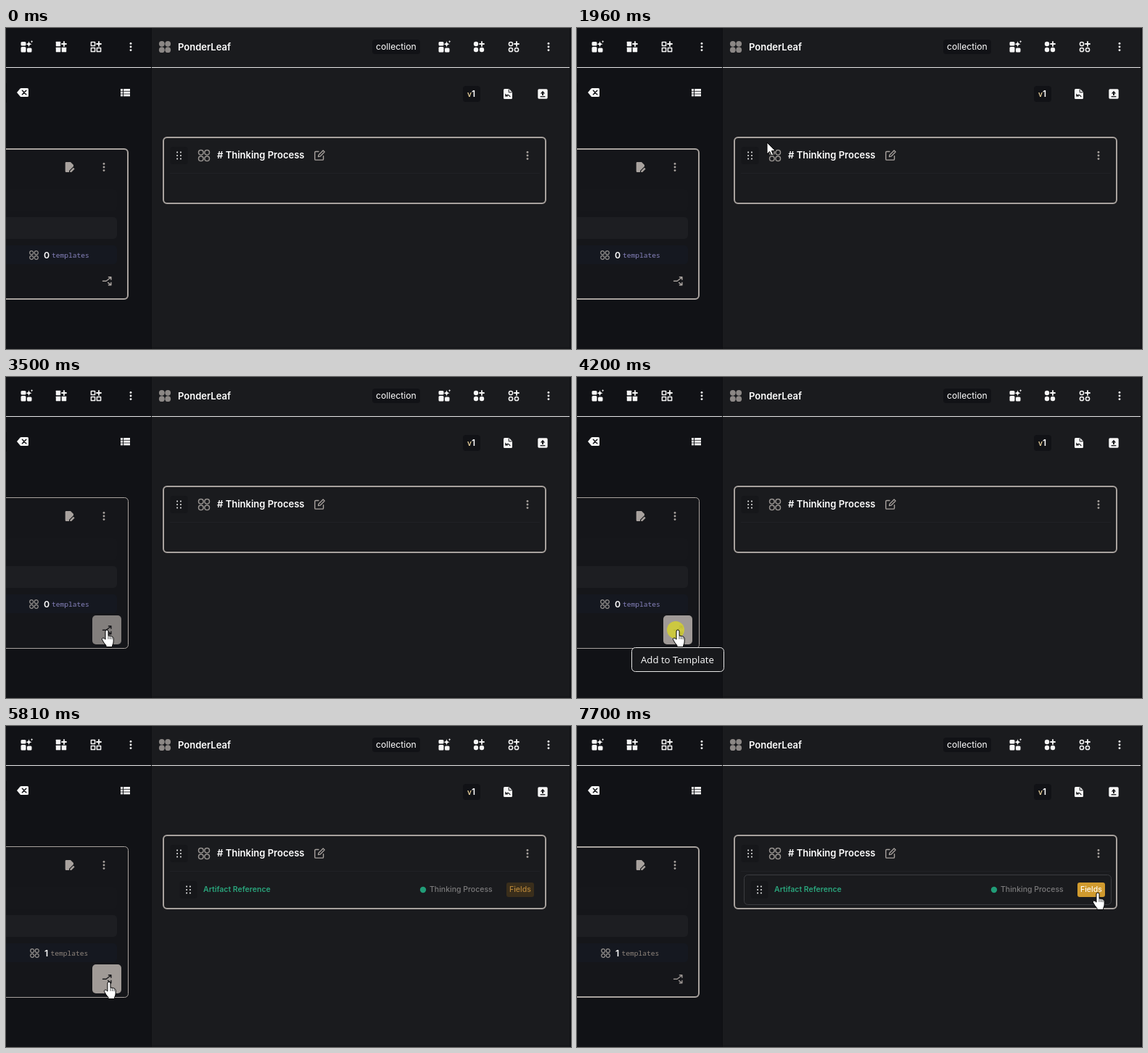
An HTML page that plays this animation: 779x443 px, repeating every 8 s.

```html
<!DOCTYPE html>
<html lang="en">
<head>
<meta charset="utf-8">
<title>Template editor</title>
<style>
  html, body { margin: 0; width: 100%; height: 100%; overflow: hidden; background: #111216; }
  svg { display: block; }
  text { font-family: Inter, sans-serif; fill: #fff; white-space: pre; }
  .semi { font-weight: 600; }
  .mono { font-family: "Noto Sans Mono", monospace; font-size: 9.6px; }
  .tip { font-family: "Open Sans", "Noto Sans", sans-serif; font-size: 13.2px; }
  .line { fill: none; stroke-linecap: round; stroke-linejoin: round; }
</style>
</head>
<body>
<svg id="stage" width="779" height="443" viewBox="0 0 779 443"></svg>
<script>
const LOOP = 8000, STEP = 70;
const GREY = '#a8a29e', DARK = '#111216', PANE = '#1a1b1e', WHITE = '#f6f6f6';
const stage = document.getElementById('stage');

function add(tag, attrs, parent = stage, content) {
  const node = document.createElementNS('http://www.w3.org/2000/svg', tag);
  set(node, attrs);
  if (content) node.textContent = content;
  parent.append(node);
  return node;
}
function set(node, attrs) {
  for (const key in attrs) node.setAttribute(key, attrs[key]);
}
const group = (parent, x = 0, y = 0) => add('g', { transform: `translate(${x} ${y})` }, parent);
const rect = (x, y, width, height, fill, rx = 0, parent) =>
  add('rect', { x, y, width, height, fill, rx }, parent);
const frame = (x, y, width, height, stroke, rx, parent) =>
  add('rect', { x, y, width, height, rx, stroke, fill: 'none' }, parent);
const dot = (cx, cy, r, fill, parent) => add('circle', { cx, cy, r, fill }, parent);
const ring = (cx, cy, r, stroke, width, parent) =>
  add('circle', { cx, cy, r, fill: 'none', stroke, 'stroke-width': width }, parent);
const shape = (d, fill, parent) => add('path', { d, fill }, parent);
const line = (d, stroke, width, parent) =>
  add('path', { d, stroke, 'stroke-width': width, class: 'line' }, parent);
const label = (x, y, content, size, cls, fill, parent) =>
  add('text', { x, y, 'font-size': size, class: cls, style: `fill:${fill}` }, parent, content);

// Icons, each drawn around its centre
function menu(x, y, fill, parent) {
  for (const dy of [-4.6, 0, 4.6]) dot(x, y + dy, 1.45, fill, parent);
}
function grip(x, y, parent) {
  rect(x - 12, y - 12, 24, 24, '#16171a', 4, parent);
  for (const dx of [-2.4, 2.4])
    for (const dy of [-4.5, 0, 4.5]) rect(x + dx - .9, y + dy - .9, 1.8, 1.8, '#e4e4e4', .4, parent);
}
function rings(x, y, gap, r, width, parent) {
  for (const dx of [-gap, gap])
    for (const dy of [-gap, gap]) ring(x + dx, y + dy, r, '#96928f', width, parent);
}
function sparkleGrid(x, y) {
  const g = group(stage, x, y);
  rect(-7.5, -7, 7, 5.5, WHITE, 1.5, g);
  rect(-7.5, 0, 7, 7.5, WHITE, 1.5, g);
  rect(1, 1.5, 6.5, 6, WHITE, 1.5, g);
  shape('M3.5-8q.5 3.8 4.2 4.3q-3.7.5-4.2 4.2q-.5-3.7-4.2-4.2q3.7-.5 4.2-4.3z', WHITE, g);
  shape('M7.6-9q.2 1.5 1.7 1.8q-1.5.2-1.7 1.7q-.2-1.5-1.7-1.7q1.5-.3 1.7-1.8z', WHITE, g);
}
function addGrid(x, y, round, filled) {
  const g = group(stage, x, y);
  for (const [cx, cy] of [[-4, -4], [-4, 4], [4, 4]]) {
    if (filled) rect(cx - 3.2, cy - 3.2, 6.4, 6.4, WHITE, round ? 3.2 : .4, g);
    else set(frame(cx - 2.6, cy - 2.6, 5.2, 5.2, WHITE, round ? 2.6 : .2, g), { 'stroke-width': 1.5 });
  }
  line('M1-4h6M4-7v6', WHITE, 1.8, g);
}

// Panes and headers
rect(200, 0, 1, 443, '#0e0f12');
rect(201, 0, 576, 440, PANE);
rect(201, 440, 576, 3, '#17181b');
rect(0, 54, 200, 1, '#e9e9e9');
rect(201, 54, 576, 1, '#e9e9e9');
sparkleGrid(28, 26);
addGrid(76, 26, false, true);
addGrid(124, 26, false, false);
menu(172, 26, WHITE);
for (const cx of [214.8, 223.2])
  for (const cy of [21.8, 30.2]) dot(cx, cy, 3.9, '#8b8785');
label(237, 30.5, 'PonderLeaf', 13, 'semi', '#fff');
rect(505, 16, 66, 20, DARK, 4);
label(510, 30.3, 'collection', 12.2, '', '#fff');
sparkleGrid(604, 26);
addGrid(652, 26, true, true);
addGrid(700, 26, true, false);
menu(748, 26, WHITE);

// Toolbars
rect(0, 76, 1, 27, '#08090b');
shape('M15 89l4.6-5.4q.6-.6 1.4-.6h8.5q1.5 0 1.5 1.5v9q0 1.5-1.5 1.5h-8.5q-.8 0-1.4-.6z', WHITE);
line('M22.4 86.2l5.4 5.6M27.8 86.2l-5.4 5.6', DARK, 1.5);
for (const y of [84, 87.7, 91.4]) {
  rect(158, y, 3, 2.9, WHITE);
  rect(162, y, 9, 2.9, WHITE);
}
rect(630, 80, 24, 22, DARK, 4);
label(636, 95, 'v', 10, 'semi', '#e6cf9a');
label(642, 95, '1', 12, 'semi', '#fff');
shape('M687.5 84h6l4.5 4.5v8q0 1.5-1.5 1.5h-9q-1.5 0-1.5-1.5v-11q0-1.5 1.5-1.5z', WHITE);
line('M693.2 84.8v4h4', PANE, 1);
line('M688.8 91.3v2.6h2.6M689 93.7q3-3.2 6 .9', PANE, 1.2);
rect(733.3, 84.3, 13.4, 13.4, WHITE, 1.6);
shape('M740 86.8l3.2 3.6h-2.2v2.6h-2v-2.6h-2.2z', PANE);
rect(736.6, 94, 6.8, 1.3, PANE);

// Left card
rect(-20, 166, 189, 209, '#15161a', 6);
const leftEdge = frame(-20, 167, 188, 207, GREY, 5);
shape('M83 185h6l4 4v2l-6 6v2h-4q-1.3 0-1.3-1.3v-11.4q0-1.3 1.3-1.3z', GREY);
shape('M88.4 197.2l4.5-4.5l1.7 1.7l-4.5 4.5h-1.7z', GREY);
menu(135, 192, GREY);
rect(0, 222, 153, 30, '#16171b', 5);
rect(-9, 261, 162, 30, '#1d1e22', 5);
rect(-9, 300, 162, 26, '#151820', 5);
const counter = group();
rings(0, 313.5, 3.3, 2.5, 1.2, counter);
const count = label(0, 317.5, '0', 12.3, 'semi', '#fff');
const unit = label(0, 317, 'templates', 9.6, 'mono', '#8783bd');

const button = group();
const buttonFace = rect(119, 329, 40, 40, GREY, 5, button);
const branch = line('M133.5 349.3h4.6l6.4-5M141.4 343.8h3.5v3.4M140.6 351.4l4 3M141.4 354.7h3.5v-3.4', GREY, 1.4, button);

// Right card
const card = rect(217, 151, 527, 91, PANE, 5);
set(card, { stroke: GREY, 'stroke-width': 2 });
grip(238.5, 176);
rings(273, 176, 4.2, 3.3, 1.5);
label(291, 180, '# Thinking Process', 13, 'semi', '#fff');
line('M431 170.5h-4q-1.2 0-1.2 1.2v9.2q0 1.2 1.2 1.2h9.4q1.2 0 1.2-1.2v-4.2', GREY, 1.4);
line('M430.5 177.6l.5-2.4l6.2-6.2l2 2l-6.2 6.2z', GREY, 1.3);
menu(719, 176, GREY);
rect(226, 200, 510, 1, '#202125');

const row = group();
const rowEdge = frame(230.5, 205.5, 506, 41, '#3b3c40', 5, row);
grip(251.5, 226, row);
label(272, 229.3, 'Artifact Reference', 10.5, 'semi', '#2aa57c', row);
dot(575, 226, 4.2, '#219c77', row);
label(584, 229.3, 'Thinking Process', 10.5, '', '#7b7a7b', row).style.fontWeight = 500;
const chip = rect(690, 216, 38, 20, '#3a2e1b', 3, row);
const chipText = label(694, 229.3, 'Fields', 10.5, '', '#b48438', row);
chipText.style.fontWeight = 500;

// Overlays
const ripple = dot(136, 349, 12, '#cfcc38');
const tip = group();
set(frame(75.5, 373.5, 127, 33, '#e6e6e6', 5, tip), { fill: '#18191c' });
label(88, 395, 'Add to Template', 13.2, 'tip', '#fff', tip);

const cursor = group();
const arrow = shape('M0 0v16l3.7-3.5l2.3 5.4l2.7-1.1l-2.3-5.3h5z', '#fff', cursor);
const hand = group(cursor);
shape('M-2 1q0-2 2-2q2 0 2 2v6q4 .2 5.6 1.4q1.6.8 1.6 2.6v4q0 3-1.6 5.5v2h-8.6v-2q-3-3-5.5-8q-.6-2 1.2-2.4q1.6-.2 3.3 2.1z', '#fff', hand);
line('M2 7.5v4M4.6 8v3.6M7 8.8v3', '#222', .8, hand);
for (const path of [arrow, hand.firstChild]) set(path, { stroke: '#000', 'stroke-width': 1 });

// Pointer tip: time, x, y
const PATH = [
  [840, 479, 436], [980, 408, 425], [1190, 299, 403], [1400, 270, 300], [1610, 264, 182],
  [1750, 262, 164], [1890, 262, 164], [2030, 262, 152], [2170, 262, 166], [2590, 262, 166],
  [2870, 176, 306], [3010, 146, 344], [3150, 139, 350], [5180, 139, 350], [5250, 137.5, 350],
  [5740, 138, 352], [5810, 142, 354], [5950, 143, 354], [6020, 143, 354], [6160, 166, 351],
  [6300, 222, 342], [6790, 525, 294], [6860, 562, 288], [7000, 625, 275], [7210, 694, 244],
  [7350, 712, 234], [7560, 718, 231]
];
function pointAt(t) {
  const i = PATH.findIndex(p => p[0] > t);
  if (i < 0) return PATH[PATH.length - 1].slice(1);
  const [t0, x0, y0] = PATH[i - 1], [t1, x1, y1] = PATH[i];
  const k = (t - t0) / (t1 - t0);
  return [x0 + (x1 - x0) * k, y0 + (y1 - y0) * k];
}

const within = (t, from, to) => t >= from && t < to;
const ramp = (t, from, to) => Math.min(1, Math.max(0, (t - from) / (to - from)));
const show = (node, on) => { node.style.display = on ? '' : 'none'; };
const mix = (a, b, k) => `rgb(${a.map((v, i) => Math.round(v + (b[i] - v) * k))})`;
function pulse(t) {
  const k = Math.abs((t % 2000) / 1000 - 1);
  return .5 + .5 * k * k * (3 - 2 * k);
}

function render(time) {
  const t = Math.floor(time / STEP) * STEP;

  show(cursor, t >= 840);
  if (t >= 840) {
    const [x, y] = pointAt(t).map(Math.round);
    set(cursor, { transform: `translate(${x} ${y})` });
  }
  const onButton = within(t, 3010, 6160), onChip = t >= 7280;
  show(hand, onButton || onChip);
  show(arrow, !(onButton || onChip));

  const onCard = within(t, 2940, 6230);
  set(leftEdge, onCard
    ? { y: 166.5, width: 188.5, height: 208, 'stroke-width': 1 }
    : { y: 167, width: 188, height: 207, 'stroke-width': 2 });
  button.style.opacity = pulse(t);
  show(buttonFace, onButton);
  set(branch, { stroke: onButton ? '#1c1c1e' : GREY });

  const added = t >= 4270;
  set(counter, { transform: `translate(${added ? 39.5 : 38.5} 0)` });
  set(count, { x: added ? 53 : 52 });
  set(unit, { x: added ? 61.5 : 63 });
  count.textContent = added ? '1' : '0';
  unit.style.fill = added ? '#8f857c' : '#8783bd';
  set(card, { height: added ? 101 : 91 });
  row.style.opacity = ramp(t, 4200, 4340);
  show(rowEdge, t >= 7210);

  const lit = ramp(t, 7210, 7420);
  set(chip, { fill: mix([58, 46, 27], [208, 154, 46], lit) });
  chipText.style.fill = mix([180, 132, 56], [255, 250, 240], lit);

  tip.style.opacity = within(t, 3990, 4270) ? ramp(t, 3920, 4060) : 0;
  ripple.style.opacity = .92 * ramp(t, 4060, 4200) * (1 - ramp(t, 4200, 4340));
}

const start = performance.now();
function tick() {
  render((performance.now() - start) % LOOP);
  requestAnimationFrame(tick);
}
tick();
</script>
</body>
</html>
```
